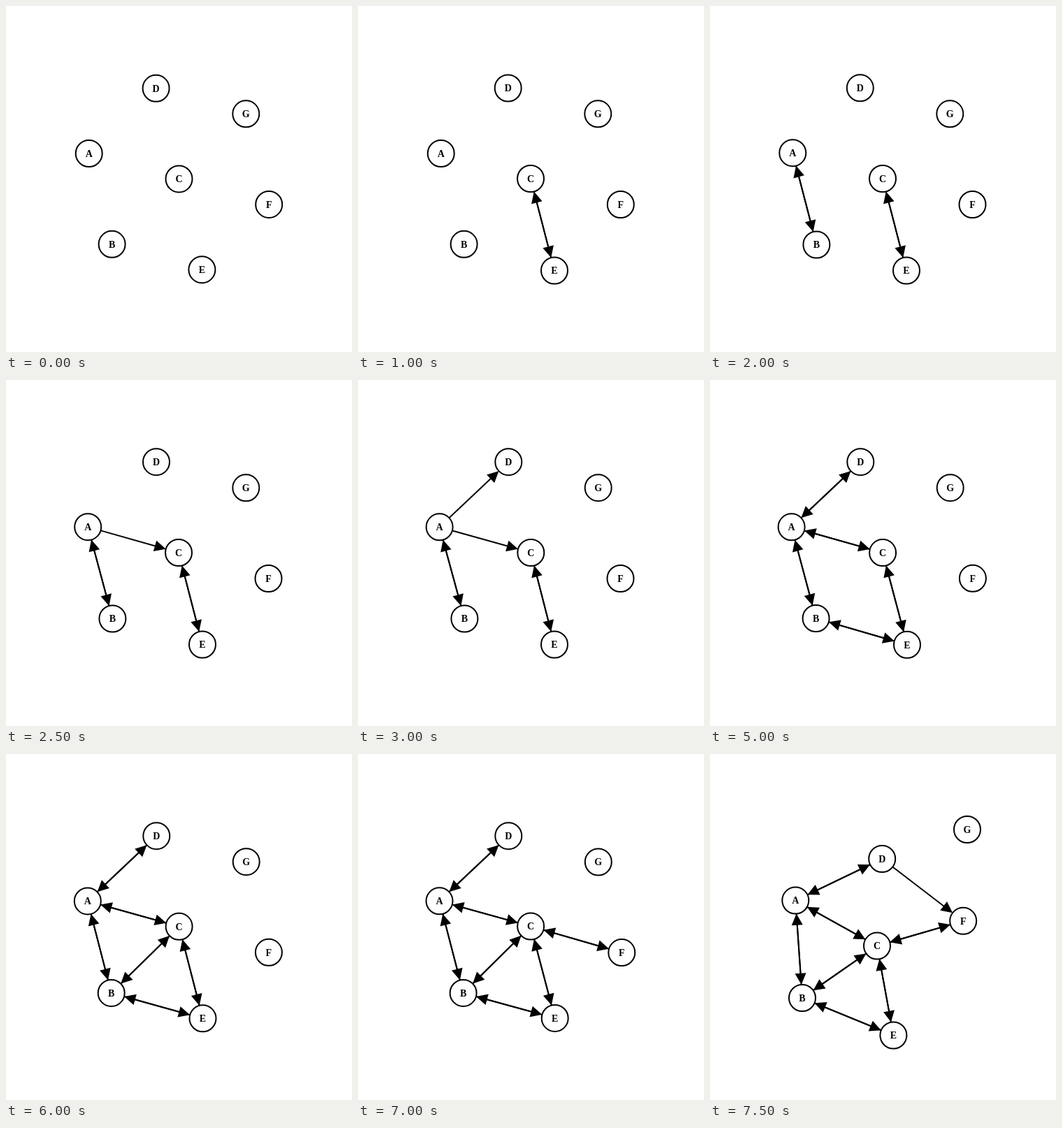
These frames come from a looping animation (495x495 px, 8 s). An HTML page:

```html
<!DOCTYPE html>
<html lang="en">
<head>
<meta charset="utf-8">
<style>
  html, body { margin: 0; width: 100%; height: 100%; overflow: hidden; background: #fff; }
  svg { display: block; width: 100vw; height: 100vh; }
  text { font: bold 14px "Liberation Serif", "Times New Roman", serif; text-anchor: middle; }
</style>
</head>
<body>
<svg id="stage" viewBox="0 0 495 495"></svg>
<script>
const STEP = 500, LOOP = 8000;
const RADIUS = 19, HEAD = 16.3, HALF = 8;
const stage = document.getElementById('stage');

// Each step adds one directed edge; the layout settles again when a new pair joins.
const steps = [
  { move: { A: [118.7, 211], B: [151.6, 340.8], C: [247.5, 247.4], D: [214.6, 117.8],
            E: [280.4, 377.2], F: [376.2, 283.9], G: [343.3, 154.3] } },
  { edge: 'CE', move: { C: [247, 247], D: [214.7, 117.5], E: [281, 378.5], F: [375.8, 284] } },
  { edge: 'EC' },
  { edge: 'AB', move: { A: [118.3, 210.2], B: [152.4, 341.5], D: [214.8, 117.3], F: [375.5, 284] } },
  { edge: 'BA' },
  { edge: 'AC', move: { A: [117.2, 210.2], D: [215, 117.2] } },
  { edge: 'AD', move: { A: [116.6, 210.3], C: [247.3, 247], D: [215.3, 117.2], G: [343.7, 154.2] } },
  { edge: 'BE', move: { B: [151.6, 341], C: [247.1, 247.1], E: [282, 378.8], F: [375.9, 283.8] } },
  { edge: 'CA' },
  { edge: 'DA' },
  { edge: 'EB' },
  { edge: 'BC', move: { A: [116.8, 210.4], B: [150.7, 341.9], C: [247.6, 246.8], E: [281.5, 378.3] } },
  { edge: 'CB' },
  { edge: 'CF', move: { A: [116.5, 210.3], B: [150.6, 341.9], C: [247.1, 246.5],
                        E: [281.7, 377.9], F: [377.3, 284.1], G: [343.8, 154.5] } },
  { edge: 'FC' },
  { edge: 'DF', move: { A: [122.3, 209.6], B: [132, 349], C: [239, 274.6], D: [246.2, 150],
                        E: [262.4, 402.5], F: [362.2, 238.8], G: [368, 108] } }
];

function arrow([x1, y1], [x2, y2]) {
  const length = Math.hypot(x2 - x1, y2 - y1);
  const ux = (x2 - x1) / length, uy = (y2 - y1) / length;
  const at = (along, side) =>
    `${(x2 - ux * along - uy * side).toFixed(2)},${(y2 - uy * along + ux * side).toFixed(2)}`;
  const base = RADIUS + HEAD;
  return `<path d="M${at(length - RADIUS, 0)}L${at(RADIUS + 3, 0)}" stroke="#000" stroke-width="2"/>` +
    `<path d="M${at(RADIUS, 0)}L${at(base, HALF)}L${at(base, -HALF)}Z"/>`;
}

function node([name, [x, y]]) {
  return `<circle cx="${x}" cy="${y}" r="${RADIUS}" fill="#fff" stroke="#000" stroke-width="2"/>` +
    `<text x="${x}" y="${y + 4.8}">${name}</text>`;
}

function draw(index) {
  const shown = steps.slice(0, index + 1);
  const places = Object.assign({}, ...shown.map(step => step.move));
  const edges = shown.filter(step => step.edge).map(step => step.edge);
  stage.innerHTML =
    edges.map(([from, to]) => arrow(places[from], places[to])).join('') +
    Object.entries(places).map(node).join('');
}

const start = performance.now();
let current = -1;

function tick() {
  const index = Math.floor((performance.now() - start) % LOOP / STEP);
  if (index !== current) draw(current = index);
  requestAnimationFrame(tick);
}
tick();
</script>
</body>
</html>
```
